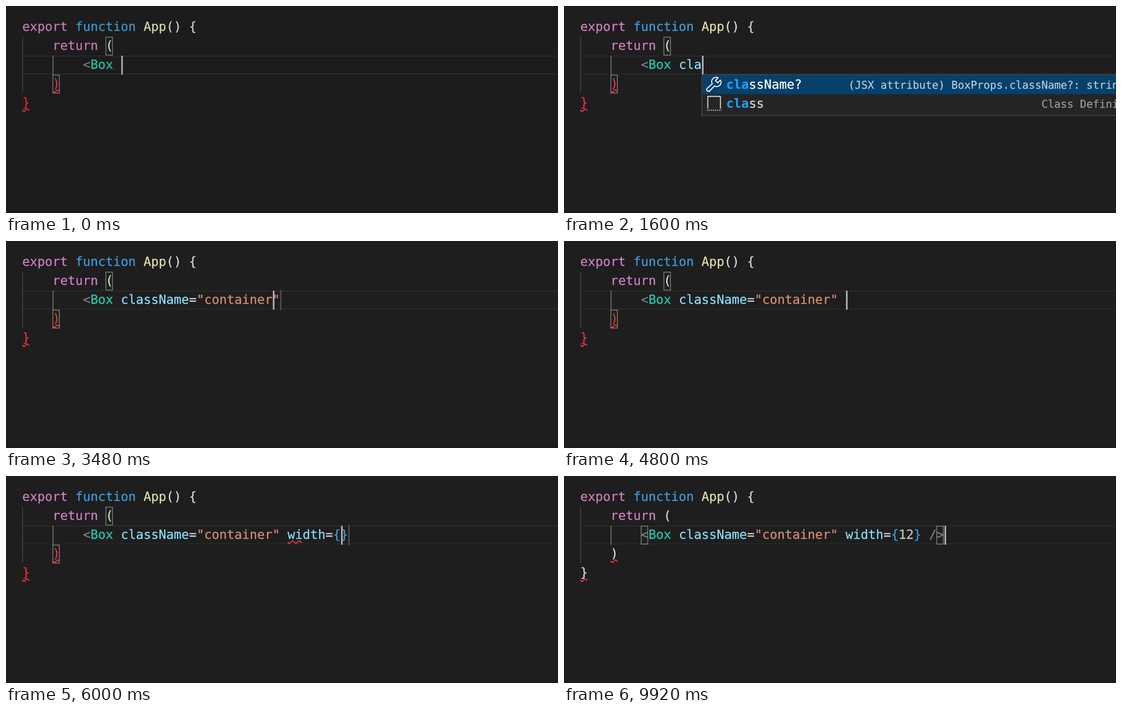
Write an HTML page that moves like this. It is 1222 by 458 pixels and loops after 10000 ms.

```html
<!DOCTYPE html>
<html lang="en">
<head>
<meta charset="utf-8">
<title>Editor typing</title>
<style>
  html, body { margin: 0; width: 100%; height: 100%; overflow: hidden; background: #1e1e1e; }
  svg { display: block; width: 1222px; height: 458px; }
  text {
    font: 27.87px "DejaVu Sans Mono", monospace;
    text-rendering: geometricPrecision;
    white-space: pre;
    fill: currentColor;
    stroke: currentColor;
    stroke-width: .3px;
  }
  .detail { font-size: 23.66px; text-anchor: end; }
  .hit { font-weight: bold; color: #18a3ff; fill: currentColor; stroke: none; }
  .box { fill: rgba(0, 100, 0, .06); stroke: #858585; stroke-width: 1.6; }
  .wave { fill: none; stroke: #f83540; stroke-width: 2.2; }
  .icon { fill: none; stroke-width: 2.3; stroke-linejoin: round; }
</style>
</head>
<body>
<svg id="stage" viewBox="0 0 1222 458"></svg>
<script>
const LOOP = 10000, ADV = 16.78, LEFT = 36, LINE = 42;
const INK = {
  keyword: '#d080c4', storage: '#3c9fe0', name: '#e0e0ac', plain: '#dadada', tag: '#828282',
  type: '#1cd0b0', attr: '#88e0ff', string: '#d68e6e', number: '#b8d2aa', error: '#ff2c30'
};
const stage = document.getElementById('stage');

// Each event changes part of the state; "|" in code marks the caret.
const events = [
  [0, { code: '|', caret: true, boxes: 'round', closers: INK.error, bg: '#1c1c1c', alpha: .95 }],
  [80, { alpha: 1 }],
  [480, { code: 'c|', bg: '#1e1e1e' }],
  [600, { code: 'cl|' }],
  [720, { code: 'cla|' }],
  [880, { popup: 'cla' }],
  [1840, { code: 'className="|"', popup: null, tail: true }],
  [2360, { caret: false }],
  [2840, { caret: true }],
  ...[...'container'].map((c, i) =>
    [2920 + i * 70, { code: `className="${'container'.slice(0, i + 1)}|"` }]),
  [3960, { code: 'className="container"|', tail: false }],
  [4480, { code: 'className="container" |' }],
  [5080, { code: 'className="container" w|' }],
  [5240, { code: 'className="container" wi|' }],
  [5400, { popup: 'wi' }],
  [5720, { wave: true }],
  [5960, { code: 'className="container" width={|}', popup: null, tail: true }],
  [6120, { boxes: 'curly' }],
  [6640, { wave: false }],
  [7120, { code: 'className="container" width={1|}' }],
  [7320, { code: 'className="container" width={12|}' }],
  [7640, { marked: true }],
  [7800, { caret: false }],
  [8120, { caret: true }],
  [8840, { code: 'className="container" width={12}|', tail: false }],
  [8960, { marked: false }],
  [9120, { code: 'className="container" width={12} |', boxes: 'round' }],
  [9440, { code: 'className="container" width={12} /|', boxes: null }],
  [9560, { code: 'className="container" width={12} />|', closers: INK.plain }],
  [9760, { boxes: 'angle' }]
];

const popups = {
  cla: [['className?', '(JSX attribute) BoxProps.className?: string...'], ['class', 'Class Definition']],
  wi: [['width?', '(JSX attribute) BoxProps.width?: number...'], ['while', 'While Statement']]
};

const colX = col => LEFT + col * ADV;

function add(parent, tag, attrs, content) {
  const node = document.createElementNS('http://www.w3.org/2000/svg', tag);
  for (const key in attrs) node.setAttribute(key, attrs[key]);
  if (content) node.textContent = content;
  return parent.appendChild(node);
}

const rect = (g, x, y, width, height, fill) => add(g, 'rect', { x, y, width, height, fill });
const word = (g, row, col, content, color) =>
  add(g, 'text', { x: colX(col), y: 55 + row * LINE, color }, content);
const box = (g, row, col) =>
  add(g, 'rect', { class: 'box', x: colX(col) + .5, y: 68.8 + (row - 1) * LINE, width: 14.6, height: 39.8 });

function wave(g, row, col, count) {
  const x0 = colX(col), y0 = 59.5 + row * LINE, end = count * ADV - 1;
  const turns = [[0, 3]];
  for (let x = 0; x < end; x += 14.4) turns.push([x + 4, 6], [x + 11, 0]);
  const points = turns.filter(p => p[0] < end).concat([[end, 4]]);
  add(g, 'polyline', { class: 'wave', points: points.map(([x, y]) => [x0 + x, y0 + y]).join(' ') });
}

function attrInk(token) {
  if (token[0] === '"') return INK.string;
  if (/[{}]/.test(token)) return INK.storage;
  if (/\d/.test(token)) return INK.number;
  if (/[/>]/.test(token)) return INK.tag;
  return token === '=' ? INK.plain : INK.attr;
}

function drawPopup(g, query, col) {
  const list = add(g, 'g', { transform: `translate(${colX(col) + .8} 0)` });
  add(list, 'rect', { x: 0, y: 152, width: 990, height: 90.5, fill: '#252526', stroke: '#454545', 'stroke-width': 1.8 });
  rect(list, 1, 153, 988, 42, '#06406b');
  popups[query].forEach(([label, detail], row) => {
    const y = 183 + row * LINE;
    const text = add(list, 'text', { x: 53.7, y, color: row ? '#d8d8d8' : '#fff' });
    let hits = 0;
    for (const c of label) {
      const hit = c === query[hits];
      if (hit) hits++;
      add(text, 'tspan', hit ? { class: 'hit' } : {}, c);
    }
    add(list, 'text', { class: 'detail', x: 979.5, y: y - .5, color: row ? '#9c9c9c' : '#b2cde0' }, detail);
  });
  add(list, 'path', { class: 'icon', stroke: '#fff',
    d: 'M36 159 A9.5 9.5 0 0 0 23 172 L12 182 A3.6 3.6 0 0 0 17 188 L28 177 A9.5 9.5 0 0 0 41 164 L35 170 L30 165 Z' });
  add(list, 'path', { class: 'icon', stroke: '#d0d0d0', d: 'M13 227 V200 H41 V227' });
  add(list, 'path', { class: 'icon', stroke: '#d0d0d0', 'stroke-dasharray': '1.9 2.3', d: 'M12 230.5 H43' });
}

function draw(s) {
  stage.replaceChildren();
  rect(stage, 0, 0, 1222, 458, s.bg);
  rect(stage, 0, 454, 1222, 4, '#1a1a1a');
  rect(stage, 37, 109.5, 1185, 2.5, '#282828');
  rect(stage, 37, 149, 1185, 2.5, '#282828');
  rect(stage, 35.7, 68, 2, 124, '#404040');
  rect(stage, 103.2, 110, 2, 42, '#707070');
  if (s.marked) rect(stage, colX(42), 110, 2 * ADV, 42, '#393a3a');

  const code = s.code.replace('|', '');
  const caretCol = 13 + s.code.indexOf('|');
  const g = add(stage, 'g', { opacity: s.alpha });

  if (s.boxes === 'round') { box(g, 1, 11); box(g, 3, 4); }
  if (s.boxes === 'curly') { box(g, 2, 41); box(g, 2, 12 + code.length); }
  if (s.boxes === 'angle') { box(g, 2, 8); box(g, 2, 47); }

  word(g, 0, 0, 'export', INK.keyword);
  word(g, 0, 7, 'function', INK.storage);
  word(g, 0, 16, 'App', INK.name);
  word(g, 0, 19, '()', INK.plain);
  word(g, 0, 22, '{', INK.plain);
  word(g, 1, 4, 'return', INK.keyword);
  word(g, 1, 11, '(', INK.plain);
  word(g, 2, 8, '<', INK.tag);
  word(g, 2, 9, 'Box', INK.type);
  word(g, 3, 4, ')', s.closers);
  word(g, 4, 0, '}', s.closers);
  for (const m of code.matchAll(/"[^"]*"|\w+|[^\s\w]/g))
    word(g, 2, 13 + m.index, m[0], attrInk(m[0]));

  wave(g, 3, 4, 1);
  wave(g, 4, 0, 1);
  if (s.wave) wave(g, 2, 35, 2);

  if (s.tail) rect(g, colX(13 + code.length) + .2, 108, 2.8, 45, '#525252');
  if (s.caret) rect(g, colX(caretCol) + 1, 110, 3.5, 42, '#b4b5b3');
  if (s.popup) drawPopup(g, s.popup, caretCol);
}

const start = performance.now();
let shown = -1;

function tick() {
  const t = (performance.now() - start) % LOOP;
  const past = events.filter(([at]) => at <= t);
  if (past.length !== shown) {
    shown = past.length;
    draw(Object.assign({}, ...past.map(e => e[1])));
  }
  requestAnimationFrame(tick);
}
tick();
</script>
</body>
</html>
```
